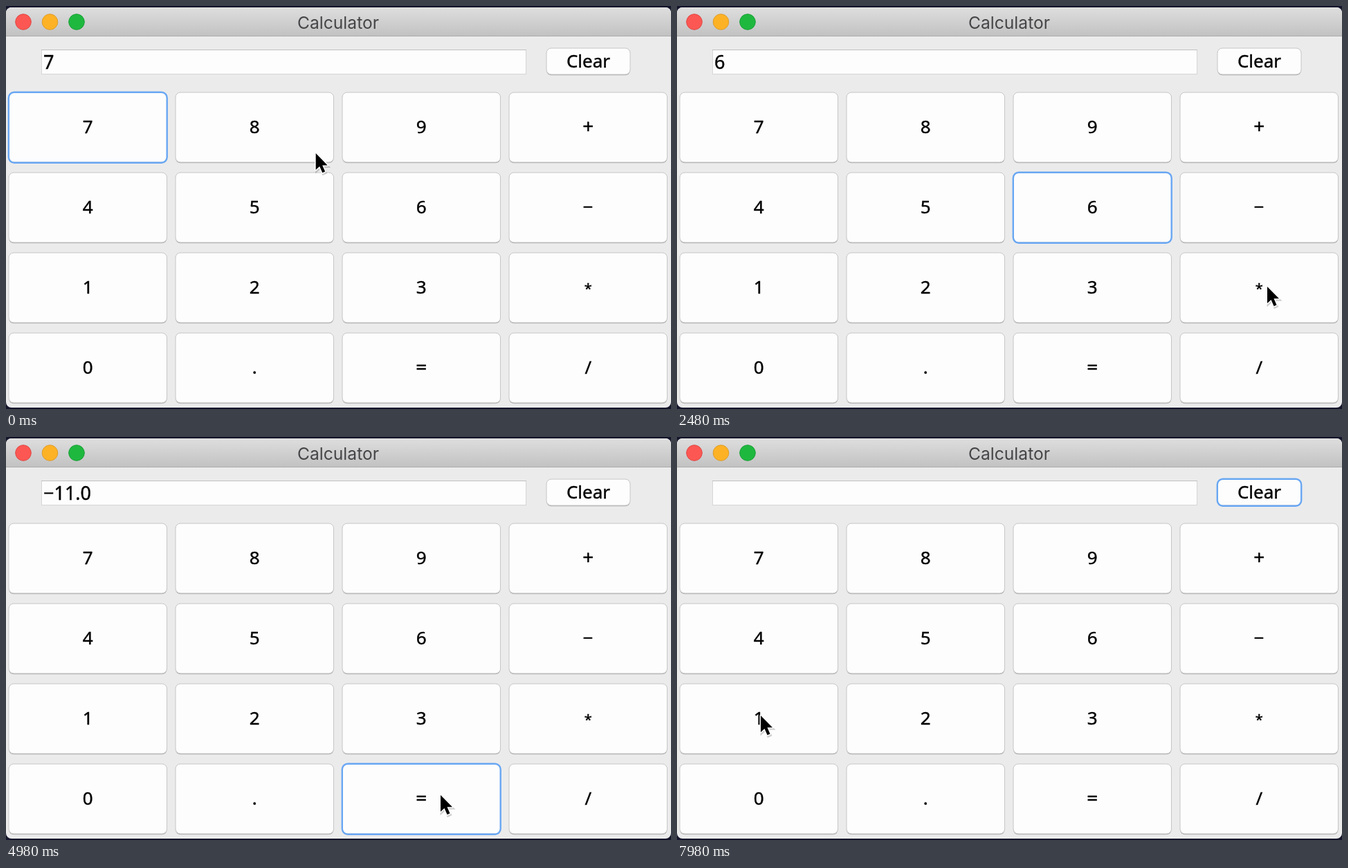
Animation, 961 px wide and 583 px high, one loop 8000 ms. Source, as an HTML page:

```html
<!DOCTYPE html>
<html lang="en">
<head>
<meta charset="utf-8">
<title>Calculator</title>
<style>
  html, body { margin: 0; width: 100%; height: 100%; overflow: hidden; background: #15152c; }
  svg { display: block; width: 961px; height: 583px; }
  text { font: 26px "Noto Sans", "Open Sans", sans-serif; fill: #000; stroke: #000; stroke-width: .4; }
  .middle { text-anchor: middle; }
  .title { font: 24.6px Inter, Roboto, sans-serif; fill: #454548; stroke: none; }
  .key { fill: #fdfdfd; stroke: #c6c6c6; }
  .shade { fill: #b0b0b0; }
  .focus { fill: none; stroke: #69a7f3; stroke-width: 2.4; }
</style>
</head>
<body>
<svg id="stage" viewBox="0 0 961 583">
  <defs>
    <linearGradient id="bar" x2="0" y2="1">
      <stop offset="0" stop-color="#dedede"/>
      <stop offset="1" stop-color="#c2c2c2"/>
    </linearGradient>
    <clipPath id="window"><rect y="2" width="961" height="579" rx="8"/></clipPath>
  </defs>
  <g clip-path="url(#window)">
    <rect width="961" height="583" fill="#ebebeb"/>
    <rect y="2" width="961" height="41" fill="url(#bar)"/>
    <rect y="43" width="961" height="1" fill="#ababab"/>
  </g>
  <g stroke-width="1">
    <circle cx="25" cy="23" r="11.3" fill="#fc5753" stroke="#df4744"/>
    <circle cx="63.5" cy="23" r="11.3" fill="#fdb225" stroke="#de9b28"/>
    <circle cx="102" cy="23" r="11.3" fill="#1fb83f" stroke="#18a035"/>
  </g>
  <text class="title middle" x="480" y="32.5">Calculator</text>
  <rect x="51.5" y="63.5" width="700" height="35" fill="#fdfdfd" stroke="#d6d6d6"/>
  <path d="M51 63.5H752" stroke="#c0c0c0"/>
  <text id="display" x="54" y="91" style="font-size:27px"></text>
  <g id="keys"></g>
  <rect id="focus" class="focus" rx="8"/>
  <g id="cursor">
    <path d="M0 1V25L5.5 20L9.6 29.2L13.5 27.4L9.5 18.3H17Z" transform="translate(1 2)"
      fill="#000" opacity=".18" stroke="#000" stroke-width="3"/>
    <path d="M0 1V25L5.5 20L9.6 29.2L13.5 27.4L9.5 18.3H17Z"
      stroke="#fff" stroke-width="3" paint-order="stroke" stroke-linejoin="round"/>
  </g>
</svg>
<script>
const DURATION = 8000;
const byId = id => document.getElementById(id);
const boxes = { Clear: { x: 781, y: 61, w: 121, h: 38, base: 89 } };

['789+', '456−', '123*', '0.=/'].forEach((row, r) => [...row].forEach((label, c) => {
  const y = 125 + r * 116;
  boxes[label] = { x: 4 + c * 241, y, w: 228.5, h: 101, base: y + 59 };
}));

byId('keys').innerHTML = Object.entries(boxes).map(([label, { x, y, w, h, base }]) => {
  const size = label === '*' ? 20 : /[+=]/.test(label) ? 28 : 26;
  const rect = (cls, dy) =>
    `<rect class="${cls}" x="${x}" y="${y + dy}" width="${w}" height="${h}" rx="7"/>`;
  return rect('shade', 1.3) + rect('key', 0) +
    `<text class="middle" x="${x + w / 2}" y="${base}" style="font-size:${size}px">${label}</text>`;
}).join('');

// Each press: time, focused button, display text.
const presses = [
  [0, '7', '7'], [760, '−', '7'], [1640, '6', '6'], [2640, '*', '6'],
  [3660, '3', '3'], [4680, '=', '−11.0'], [7040, 'Clear', '']
];

// Pointer route: time, x, y.
const route = [
  [-400, 130, 185], [0, 447, 212], [620, 811, 315], [960, 811, 315],
  [1480, 622, 302], [1860, 622, 302], [2400, 853, 405], [2860, 853, 405],
  [3420, 638, 415], [3880, 638, 415], [4460, 628, 517], [5820, 628, 517],
  [6300, 764, 325], [6780, 846, 80], [7240, 846, 80], [7940, 121, 402], [8100, 121, 402]
];

const slope = (i, axis) => i < 0 || i > route.length - 2 ? 0 :
  (route[i + 1][axis] - route[i][axis]) / (route[i + 1][0] - route[i][0]);

function tangent(i, axis) {
  const before = slope(i - 1, axis), after = slope(i, axis);
  return before * after > 0 ? 2 * before * after / (before + after) : 0;
}

// Monotone cubic: smooth through the points, still during pauses.
function pointer(t, axis) {
  const i = route.findIndex(p => p[0] > t) - 1;
  const a = route[i], b = route[i + 1], span = b[0] - a[0], u = (t - a[0]) / span;
  const s = u * u * (3 - 2 * u);
  return a[axis] + (b[axis] - a[axis]) * s + span * u * (1 - u) *
    ((1 - u) * tangent(i, axis) - u * tangent(i + 1, axis));
}

function draw(t) {
  const [, label, value] = presses.findLast(p => p[0] <= t);
  const { x, y, w, h } = boxes[label];
  byId('display').textContent = value;
  Object.entries({ x: x - .2, y: y - .2, width: w + .4, height: h + .9 })
    .forEach(([name, v]) => byId('focus').setAttribute(name, v));
  byId('cursor').setAttribute('transform', `translate(${pointer(t, 1)} ${pointer(t, 2)})`);
}

const start = performance.now();
function tick() {
  draw((performance.now() - start) % DURATION);
  requestAnimationFrame(tick);
}
tick();
</script>
</body>
</html>
```
